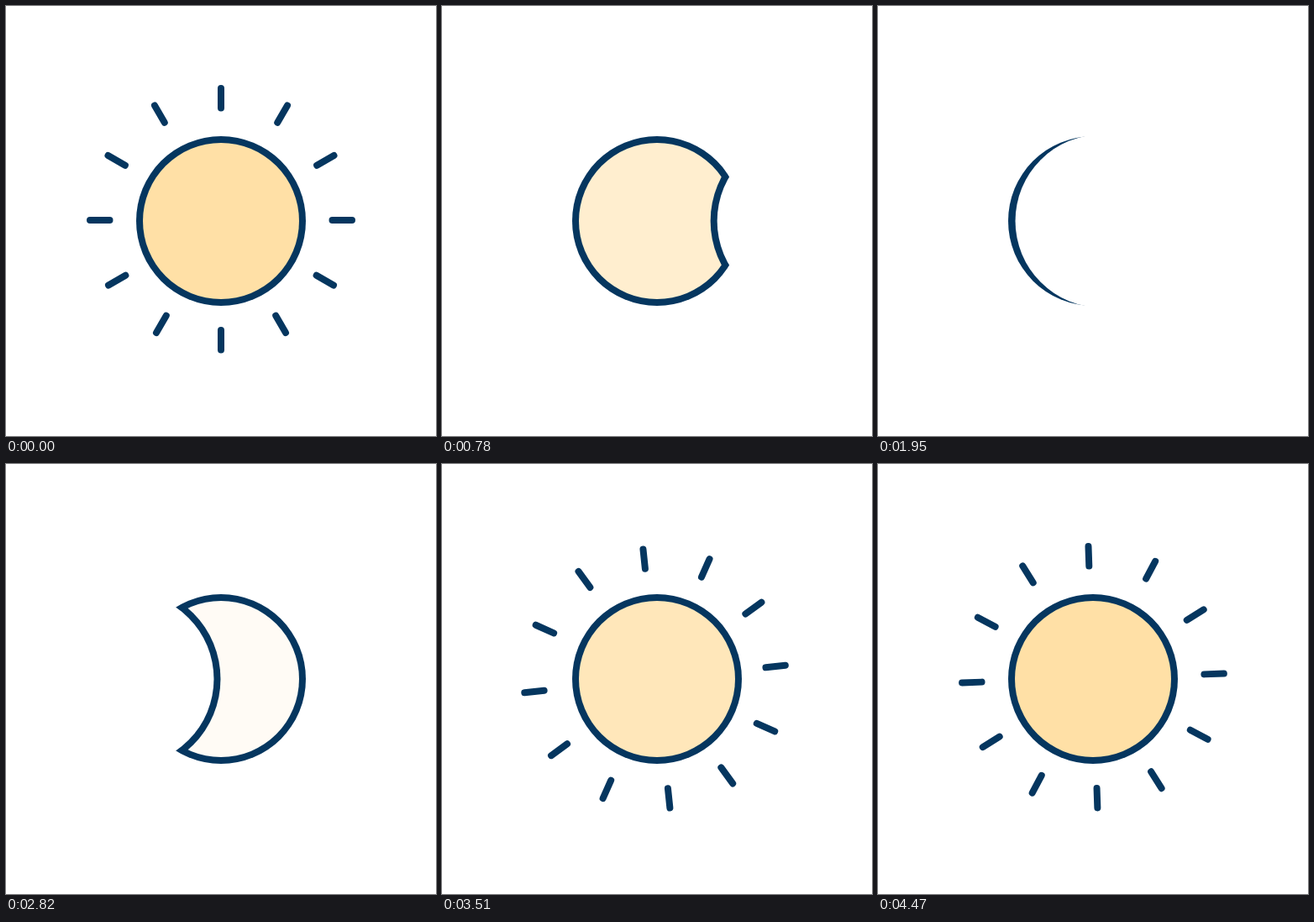
Write an HTML page with a canvas that moves like this. It is 512x512 px and loops after 4500 ms.

```html
<!DOCTYPE html>
<html lang="en">
<head>
<meta charset="utf-8">
<title>Sun eclipse</title>
<style>
  html, body { margin: 0; width: 100%; height: 100%; overflow: hidden; background: #fff; }
  canvas { display: block; width: 512px; height: 512px; }
</style>
</head>
<body>
<canvas id="stage" width="512" height="512"></canvas>
<script>
const ctx = document.getElementById('stage').getContext('2d');
const LOOP = 4500, STEP = 30, FRAMES = LOOP / STEP;
const INK = '#05365f', SUN = [255, 224, 166];
const RAY_LENGTH = 23.5;

// Outer ray tips, clockwise from the top, relative to the sun's centre
const TIPS = [
  [0, -158], [79, -137.5], [134.5, -78], [156, -1], [134, 76.5], [77, 133], [0, 153.5]
];

const progress = (frame, from, to) => Math.min(1, Math.max(0, (frame - from) / (to - from)));

function disc(x, radius, color) {
  ctx.fillStyle = color;
  ctx.beginPath();
  ctx.arc(x, 0, radius, 0, 2 * Math.PI);
  ctx.fill();
}

function drawSun(frame) {
  const fade = progress(frame, 10, 45) - progress(frame, 90, 125);
  const fill = SUN.map(c => Math.round(c + (255 - c) * fade));
  disc(0, 101, INK);
  disc(0, 93, `rgb(${fill})`);
}

function drawMoon(frame) {
  const x = 242 - 484 * progress(frame, 10, 125);
  ctx.globalCompositeOperation = 'source-atop';
  disc(x, 111, INK);
  ctx.globalCompositeOperation = 'destination-out';
  disc(x, 103, '#000');
  ctx.globalCompositeOperation = 'source-over';
}

function drawRays(frame) {
  const size = 1 - progress(frame, 10, 25) + progress(frame, 100, 114);
  if (size <= 0) return;
  const turn = frame < FRAMES / 2 ? frame : frame - FRAMES;
  ctx.rotate(turn * 2 * Math.PI / 180);
  ctx.strokeStyle = INK;
  ctx.lineWidth = 8;
  ctx.lineCap = 'round';
  ctx.beginPath();
  TIPS.forEach(([x, y], i) => {
    const angle = i * Math.PI / 6;
    const dx = Math.sin(angle) * RAY_LENGTH, dy = -Math.cos(angle) * RAY_LENGTH;
    for (const side of i % 6 ? [1, -1] : [1]) {
      ctx.moveTo(side * (x - dx), y - dy);
      ctx.lineTo(side * (x - dx * (1 - size)), y - dy * (1 - size));
    }
  });
  ctx.stroke();
}

function draw() {
  const frame = Math.floor(performance.now() % LOOP / STEP);
  ctx.setTransform(1, 0, 0, 1, 0, 0);
  ctx.clearRect(0, 0, 512, 512);
  ctx.translate(256, 256);
  drawSun(frame);
  drawMoon(frame);
  drawRays(frame);
  requestAnimationFrame(draw);
}
draw();
</script>
</body>
</html>
```
